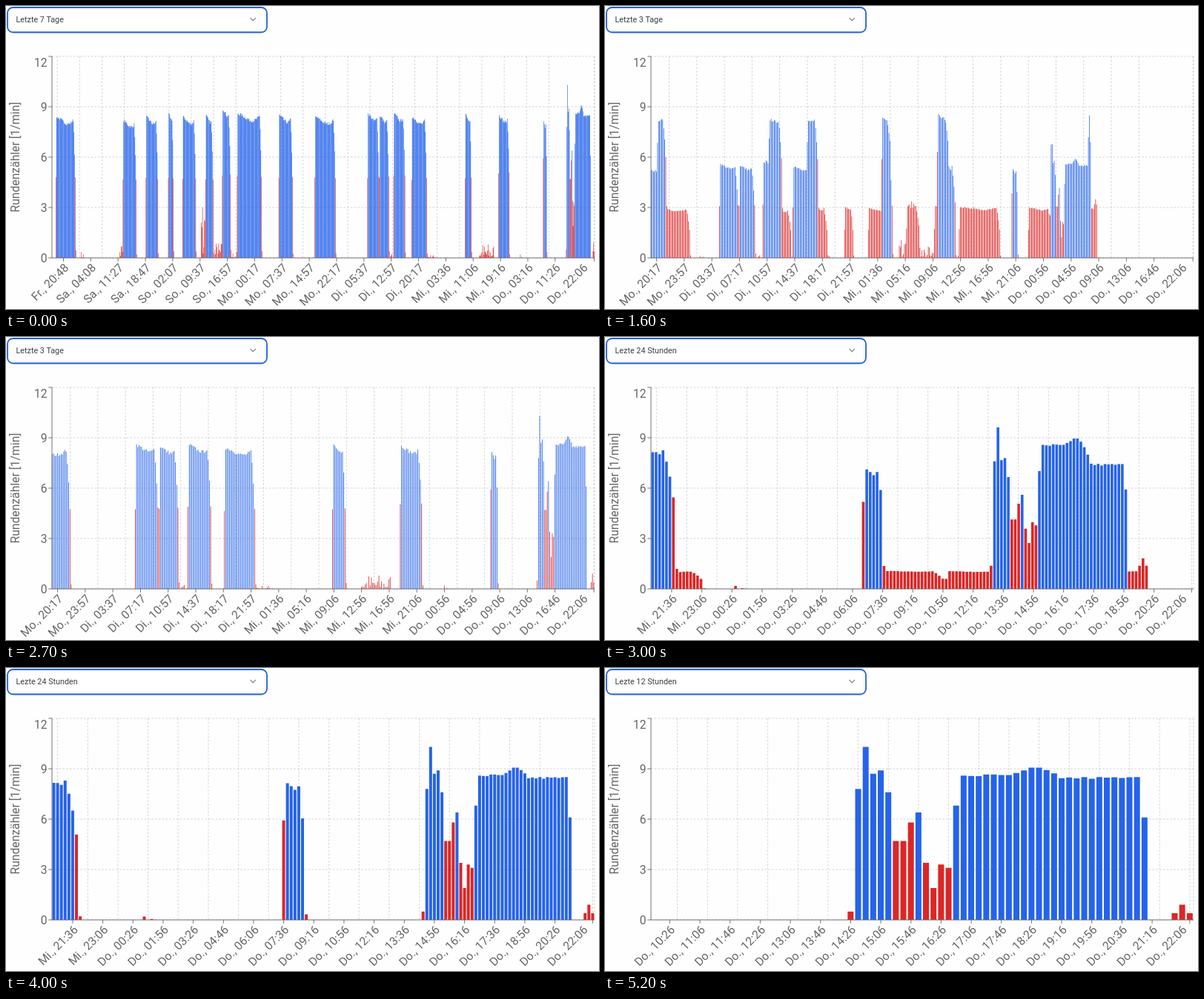
An HTML page that plays this animation: 800 by 409 pixels, repeating every 5.4 s.

```html
<!DOCTYPE html>
<html lang="de">
<head>
<meta charset="utf-8">
<title>Rundenzähler</title>
<style>
  html, body { margin: 0; width: 100%; height: 100%; overflow: hidden; background: #fefefe; }
  svg { display: block; width: 800px; height: 409px; font-family: Roboto, sans-serif; }
  .axis text, .label { font-size: 15.7px; fill: #666; }
  .axis path { stroke: #666; stroke-width: .9; fill: none; }
  .grid { stroke: #ccc; stroke-width: .9; stroke-dasharray: 2.4 2.4; fill: none; }
  .pick { font-size: 10.8px; fill: #3b3f46; }
  .end { text-anchor: end; }
</style>
</head>
<body>
<svg viewBox="0 0 800 409">
  <rect x="2" y="2" width="350" height="33.5" rx="7.5" fill="#fff" stroke="#2260d6" stroke-width="1.8"/>
  <rect x="4.5" y="4.5" width="345" height="28.5" rx="5" fill="none" stroke="#eceef1" stroke-width=".8"/>
  <text class="pick" id="pick" x="13.5" y="21.8"></text>
  <path d="M329.5 16l3.7 3.7 3.7-3.7" fill="none" stroke="#8f8f96" stroke-width="1.4"/>
  <path class="grid" id="grid"/>
  <path id="blue" fill="#2563eb"/>
  <path id="red" fill="#dc2626"/>
  <g class="axis">
    <path id="lines"/>
    <g id="yLabels" class="end"></g>
    <g id="xLabels" class="end"></g>
  </g>
  <text class="label" text-anchor="middle" transform="translate(17.5 204) rotate(-90)">Rundenzähler [1/min]</text>
</svg>
<script>
const LEFT = 62, RIGHT = 794, TOP = 68, BASE = 340, UNIT = (BASE - TOP) / 12;
const LOOP = 5400, MOVE = 400, LIMIT = 6, COUNT = 874;
const $ = id => document.getElementById(id);

let seed = 7;
const rand = () => (seed = seed * 16807 % 2147483647) / 2147483647;

// One value per ten minutes
const data = new Array(COUNT).fill(0);

// A run: steep start, slightly sagging plateau, rounded fall and a straggler
function run(from, to, height, edge = .56) {
  const n = to - from, span = Math.min(3, n / 4 | 0);
  for (let k = 0; k <= n; k++) {
    const fall = Math.max(0, 1 - (n - k) / span) ** 1.4;
    const side = 1 - (1 - edge) * (k ? fall : 1);
    const sag = 1 - .05 * Math.sin(Math.PI * (k / n) ** 1.5);
    data[from + k] = height * side * sag + (rand() - .5) * .2;
  }
  data[to + 1] = .2 + rand() * .4;
}

// Stray turns between runs
function strays(from, to, max) {
  for (let k = from; k <= to; k++) data[k] = max * rand() ** 2;
}

strays(46, 50, .4);
strays(109, 113, 1.2);
strays(240, 247, 4.5);
strays(262, 273, 1);
strays(289, 297, .4);
strays(545, 549, .3);
strays(605, 618, .2);
strays(688, 712, .9);
strays(754, 758, .3);
[[6, 37, 8.4], [114, 135, 8.2], [151, 170, 8.4], [187, 195, 8.6], [210, 231, 8.4],
 [247, 259, 8.5], [274, 287, 8.9], [298, 337, 8.6], [365, 387, 8.5], [423, 456, 8.4],
 [508, 526, 8.6], [527, 542, 8.5], [550, 568, 8.6], [579, 603, 8.4], [665, 675, 8.6],
 [719, 736, 8.5, .6], [791, 796, 8.2, .73]].forEach(r => run(...r));

// The last run opens with a spike and a dip, then settles
[.5, 7.8, 10.3, 8.7, 8.9, 7.6, 4.7, 4.7, 5.8, 6.4, 3.4, 1.9, 3.3, 3.1, 6.8]
  .forEach((v, k) => data[828 + k] = v);
for (let k = 0; k < 24; k++) {
  data[843 + k] = (k < 13 ? 8.6 : 8.45) + .45 * Math.exp(-(((k - 9.5) / 2) ** 2)) + (rand() - .5) * .15;
}
data[867] = 6.1;
for (let k = 0; k < 3; k++) data[871 + k] = .9 - .5 * Math.abs(k - 1);

// Clock of a sample, counted back from Do 22:06; some samples are missing
const gaps = [216, 656, 683, 695, 703, 714, 718, 727, 739, 756, 763, 787, 793, 796, 801, 802, 856];
const days = ['So', 'Mo', 'Di', 'Mi', 'Do', 'Fr', 'Sa'];
const WEEK = 7 * 1440;
function clock(i) {
  const slots = COUNT - 1 - i + gaps.filter(g => g > i).length;
  const drift = (i < 610) + (i < 90);
  const m = (4 * 1440 + 22 * 60 + 6 - slots * 10 + drift + WEEK) % WEEK;
  const two = n => String(n | 0).padStart(2, '0');
  return `${days[m / 1440 | 0]}., ${two(m % 1440 / 60)}:${two(m % 60)}`;
}

// Start time, bar count and width, first and step of ticks and of grid lines
const views = [
  { at: 0, name: 'Letzte 7 Tage', count: COUNT, width: .62, tick: [18, 44], grid: [8, 36] },
  { at: 1450, name: 'Letzte 3 Tage', count: 432, width: .8, tick: [4, 22], grid: [14, 22] },
  { at: 2767, name: 'Lezte 24 Stunden', count: 144, width: 4, tick: [5, 8], grid: [1, 8] },
  { at: 4190, name: 'Lezte 12 Stunden', count: 72, width: 8, tick: [2, 4], grid: [3, 4] }
];
for (const v of views) {
  v.band = (RIGHT - LEFT) / v.count;
  v.values = data.slice(-v.count);
}

const mid = (v, i) => LEFT + (i + .5) * v.band;
const vLine = (x, a, b) => `M${x.toFixed(2)} ${a}V${b}`;
const hLine = (y, a, b) => `M${a} ${y}H${b}`;
const levels = [0, 3, 6, 9, 12];
const yOf = n => BASE - n * UNIT;

$('yLabels').innerHTML = levels.map(n =>
  `<text x="55.7" y="${(n === 12 ? 76 : yOf(n)) + 5.6}">${n}</text>`).join('');

function drawAxes(v) {
  $('pick').textContent = v.name;
  const last = v.count - 1;

  let grid = levels.map(n => hLine(yOf(n), LEFT, RIGHT)).join('') + vLine(RIGHT, TOP, BASE);
  for (let i = v.grid[0]; mid(v, i) < 752; i += v.grid[1]) grid += vLine(mid(v, i), TOP, BASE);
  $('grid').setAttribute('d', grid + vLine(mid(v, last), TOP, BASE));

  let lines = vLine(LEFT, TOP, BASE) + hLine(BASE, LEFT, RIGHT) +
    levels.map(n => hLine(yOf(n), 57.3, LEFT)).join('');
  let labels = '';
  const addTick = (i, x) => {
    lines += vLine(mid(v, i), BASE, 344.8);
    labels += `<text transform="translate(${x.toFixed(2)} 346.3) rotate(-45)" y="11.2">${clock(COUNT - v.count + i)}</text>`;
  };
  for (let i = v.tick[0]; mid(v, i) < 745; i += v.tick[1]) addTick(i, mid(v, i));
  addTick(last, 777.8);
  $('xLabels').innerHTML = labels;
  $('lines').setAttribute('d', lines);
}

// cubic-bezier(.25, .1, .25, 1)
const bez = (a, b, s) => 3 * a * s * (1 - s) ** 2 + 3 * b * s * s * (1 - s) + s ** 3;
function ease(p) {
  if (p >= 1) return 1;
  let lo = 0, hi = 1;
  for (let k = 0; k < 24; k++) {
    const m = (lo + hi) / 2;
    if (bez(.25, .25, m) < p) lo = m; else hi = m;
  }
  return bez(.1, 1, lo);
}

function drawBars(from, to, t) {
  const mix = (a, b) => a + (b - a) * t;
  const band = mix(from.band, to.band), w = mix(from.width, to.width).toFixed(3);
  let blue = '', red = '';
  to.values.forEach((value, i) => {
    const h = mix(from.values[i], value) * UNIT;
    if (h < .1) return;
    const bar = `M${(LEFT + (i + .1) * band).toFixed(3)} ${BASE}v${-h.toFixed(2)}h${w}V${BASE}z`;
    if (value < LIMIT) red += bar; else blue += bar;
  });
  $('blue').setAttribute('d', blue);
  $('red').setAttribute('d', red);
}

let shown = -1, pose = -1;
function frame() {
  const now = performance.now() % LOOP;
  let k = views.length - 1;
  while (views[k].at > now) k--;
  const t = k ? ease((now - views[k].at) / MOVE) : 1;
  if (k !== shown) drawAxes(views[k]);
  if (k !== shown || t !== pose) drawBars(views[k ? k - 1 : 0], views[k], t);
  shown = k;
  pose = t;
  requestAnimationFrame(frame);
}
frame();
</script>
</body>
</html>
```
